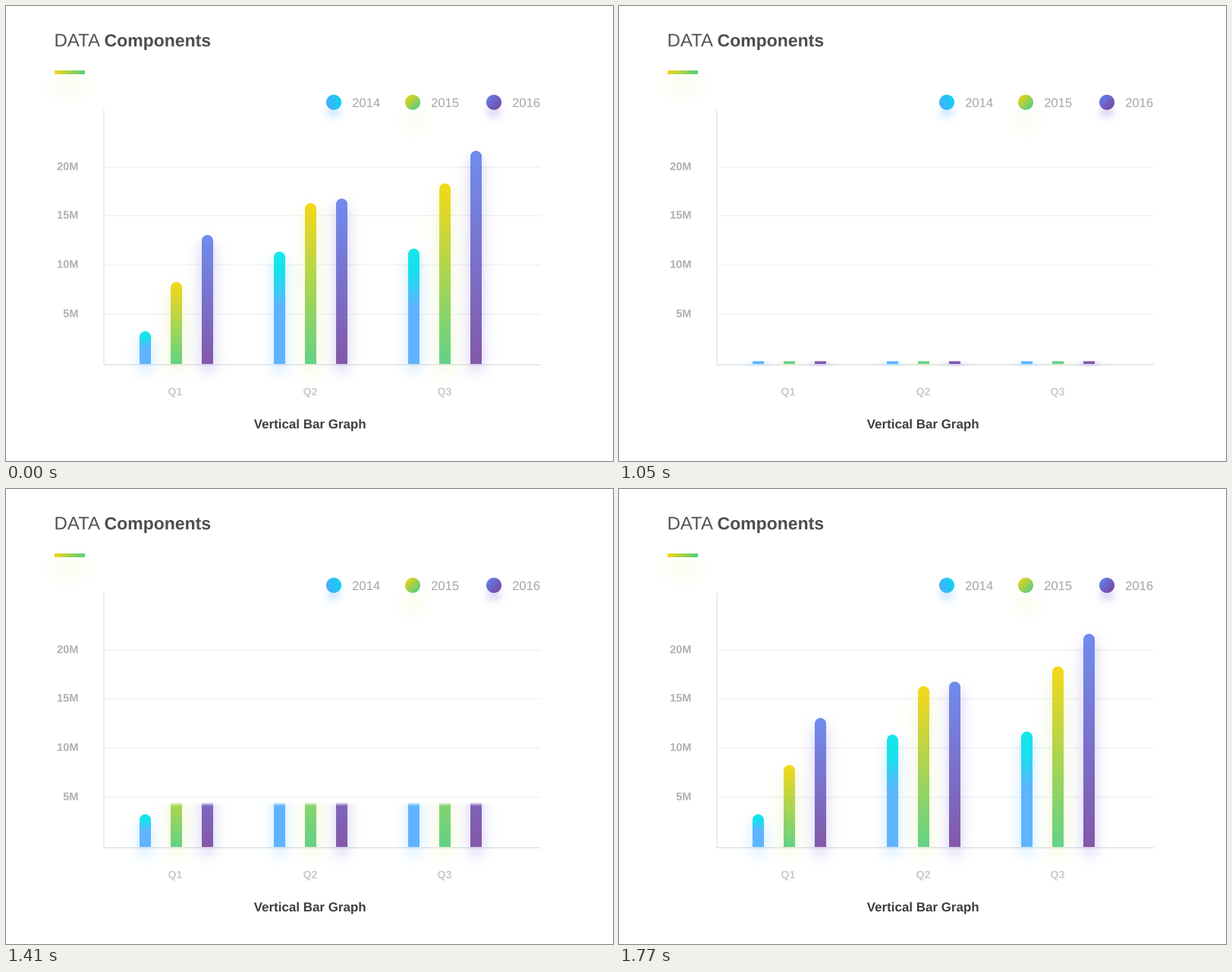
A matplotlib script that plays this animation: 800 px wide and 600 px high, repeating every 4.5 s.

```python
import math

import matplotlib.pyplot as plt
import numpy as np
from matplotlib.animation import FuncAnimation
from matplotlib.patches import PathPatch
from matplotlib.textpath import TextPath
from matplotlib.transforms import Affine2D

W, H = 800, 600
STEP = 30
FRAMES = 150
HIDE, SHOWN = 21, 59          # bars vanish / are complete again
BASE = 472                    # foot of the bars

X = np.arange(W)
Y = np.arange(H)

CYAN, BLUE = "#14e8ea", "#5fb4ff"
YELLOW, GREEN = "#f5d818", "#62d288"
INDIGO, PURPLE = "#708cee", "#8358a8"


def rgb(code):
    return np.array([int(code[i:i + 2], 16) for i in (1, 3, 5)], float)


def span(v, lo, hi):
    """Share of each pixel lying between lo and hi."""
    return np.clip(np.minimum(v + 1, hi) - np.maximum(v, lo), 0, 1)


def soft(v, lo, hi, sigma):
    """Gaussian-blurred interval."""
    k = 1 / (sigma * math.sqrt(2))
    return np.array([math.erf((p + .5 - lo) * k) - math.erf((p + .5 - hi) * k)
                     for p in v]) / 2


def rect(x0, y0, x1, y1):
    return span(Y, y0, y1)[:, None] * span(X, x0, x1)[None, :]


def disc(cx, cy, r):
    dist = np.hypot(X[None, :] + .5 - cx, Y[:, None] + .5 - cy)
    return np.clip(r + .5 - dist, 0, 1)


def blur(x0, y0, x1, y1, sigma):
    return soft(Y, y0, y1, sigma)[:, None] * soft(X, x0, x1, sigma)[None, :]


def ramp(t, stops):
    """Colour field for t from (position, colour) stops."""
    pos = [p for p, _ in stops]
    cols = np.array([rgb(c) for _, c in stops])
    return np.stack([np.interp(t, pos, cols[:, i]) for i in range(3)], axis=-1)


def over(layer, color, alpha):
    """Lay a colour on a premultiplied (rgb, alpha) layer."""
    col, a = layer
    cover = alpha[..., None]
    return col * (1 - cover) + color * cover, a * (1 - alpha) + alpha


# ---- still parts -----------------------------------------------------------

def still():
    layer = np.full((H, W, 3), 255.), np.ones((H, W))
    for y in (212, 276, 341, 406):
        layer = over(layer, rgb("#f1f1f2"), rect(130, y - .25, 705, y + 1.25))
    layer = over(layer, rgb("#ebecee"), rect(128, 137, 130, 474))
    layer = over(layer, rgb("#e8e9eb"), rect(128, 472, 705, 474))

    lime = rgb("#bedc3c")
    layer = over(layer, lime, .13 * blur(64, 96, 104, 114, 11))
    line = ramp((X - 64) / 40, [(0, "#f3d51c"), (1, "#4fcf7c")])[None]
    layer = over(layer, line, rect(64, 85, 104, 90))

    layer = over(layer, rgb(BLUE), .34 * blur(424, 133, 440, 146, 5))
    layer = over(layer, lime, .09 * blur(524, 138, 550, 164, 8))
    layer = over(layer, rgb("#7a6ad8"), .32 * blur(635, 133, 651, 146, 5))
    dots = ((432, 1, -.35, "#46adfd", "#0fd2f0"),
            (536, 1, 1, "#e0d31c", "#5dcd82"),
            (643, 1, 1, "#627ee6", "#7748a4"))
    for cx, dx, dy, c0, c1 in dots:
        slope = (X[None, :] + .5 - cx) * dx + (Y[:, None] + .5 - 127) * dy
        t = .5 + slope / (20 * math.hypot(dx, dy))
        layer = over(layer, ramp(t, [(0, c0), (1, c1)]), disc(cx, 127, 10))
    return layer[0]


# ---- bars ------------------------------------------------------------------

KINDS = (
    ([(0, CYAN), (.2, "#18e0ec"), (.5, BLUE), (1, BLUE)],
     "#5abeff", .38, 9),
    ([(0, YELLOW), (1, GREEN)], "#c4de46", .30, 11),
    ([(0, INDIGO), (1, PURPLE)], "#7468dc", .36, 9),
)
TOPS = ((429, 364, 302), (324, 260, 254), (320, 234, 191))


def bars():
    layer = np.zeros((H, W, 3)), np.zeros((H, W))
    items = [(176 + 177 * q + 41 * k, TOPS[q][k], KINDS[k])
             for q in range(3) for k in range(3)]
    for x, top, (_, glow, power, sigma) in items:
        shade = blur(x, top + 10, x + 15, BASE + 9, sigma)
        layer = over(layer, rgb(glow), power * shade)
    for x, top, (stops, *_) in items:
        t = (Y + .5 - top) / (BASE - top)
        body = np.maximum(rect(x, top + 7.5, x + 15, BASE),
                          disc(x + 7.5, top + 7.5, 7.5))
        layer = over(layer, ramp(t, stops)[:, None], body)
    return layer


# ---- reveal: a window opening up and down from the foot, motion-blurred ----

# frame, half height, speed per frame
KEYS = ((30, 0, .3), (39, 10.5, 2.3), (47, 56.5, 10),
        (51, 120.5, 25), (59, 284, 14))


def opening(n):
    """Half height and speed of the window (cubic Hermite)."""
    for (a, p, v), (b, q, w) in zip(KEYS, KEYS[1:]):
        if n <= b:
            break
    d = b - a
    u = (n - a) / d
    rise = q - p
    c2 = 3 * rise - d * (2 * v + w)
    c3 = d * (v + w) - 2 * rise
    half = p + u * (d * v + u * (c2 + u * c3))
    speed = v + u * (2 * c2 + 3 * u * c3) / d
    return half, speed


def window(n):
    if n < HIDE or n >= SHOWN:
        return np.ones(H)
    if n <= KEYS[0][0]:
        return np.zeros(H)
    half, speed = opening(n)
    reach = np.abs(Y + .5 - BASE)
    return np.clip((half - reach) / max(1, speed / 2) + .5, 0, 1)


# ---- figure ----------------------------------------------------------------

fig = plt.figure(figsize=(8, 6), dpi=100, facecolor="white")
ax = fig.add_axes([0, 0, 1, 1])
ax.set_axis_off()

ground = still()
bar_col, bar_alpha = bars()


def picture(n):
    m = window(n)[:, None]
    rest = 1 - (bar_alpha * m)[..., None]
    return np.rint(ground * rest + bar_col * m[..., None]).astype(np.uint8)


image = ax.imshow(picture(0), extent=(0, W, H, 0), interpolation="nearest",
                  aspect="auto")
ax.set_xlim(0, W)
ax.set_ylim(H, 0)


def label(s, x, y, size, color, weight="normal", anchor=0):
    """Text by baseline y; anchor 0, .5 or 1 puts its left, middle or right at x."""
    path = TextPath((0, 0), s, size=size,
                    prop={"family": "Liberation Sans", "weight": weight})
    box = path.get_extents()
    left = x - box.x0 - anchor * box.width
    place = Affine2D().scale(1, -1).translate(left, y)
    ax.add_patch(PathPatch(place.transform_path(path), fc=color, lw=0))


label("DATA", 65.5, 53.3, 24, "#555153")
label("Components", 130.5, 53.3, 23, "#504c4e", "bold")
for year, x in (("2014", 457), ("2015", 561), ("2016", 668)):
    label(year, x, 133.2, 16.6, "#a6a6a6")
for value, y in (("20M", 216.4), ("15M", 280.4), ("10M", 345.4), ("5M", 410.4)):
    label(value, 94.5, y, 14.6, "#b0b0b0", "bold", 1)
for i, x in enumerate((223, 401, 578)):
    label(f"Q{i + 1}", x, 513.4, 14.2, "#cacaca", "bold", .5)
label("Vertical Bar Graph", 400.2, 557, 16.95, "#3e3e40", "bold", .5)


def draw(n):
    image.set_data(picture(n))
    return image,


anim = FuncAnimation(fig, draw, frames=FRAMES, interval=STEP, repeat=True,
                     repeat_delay=0, blit=False)
plt.show()
```
